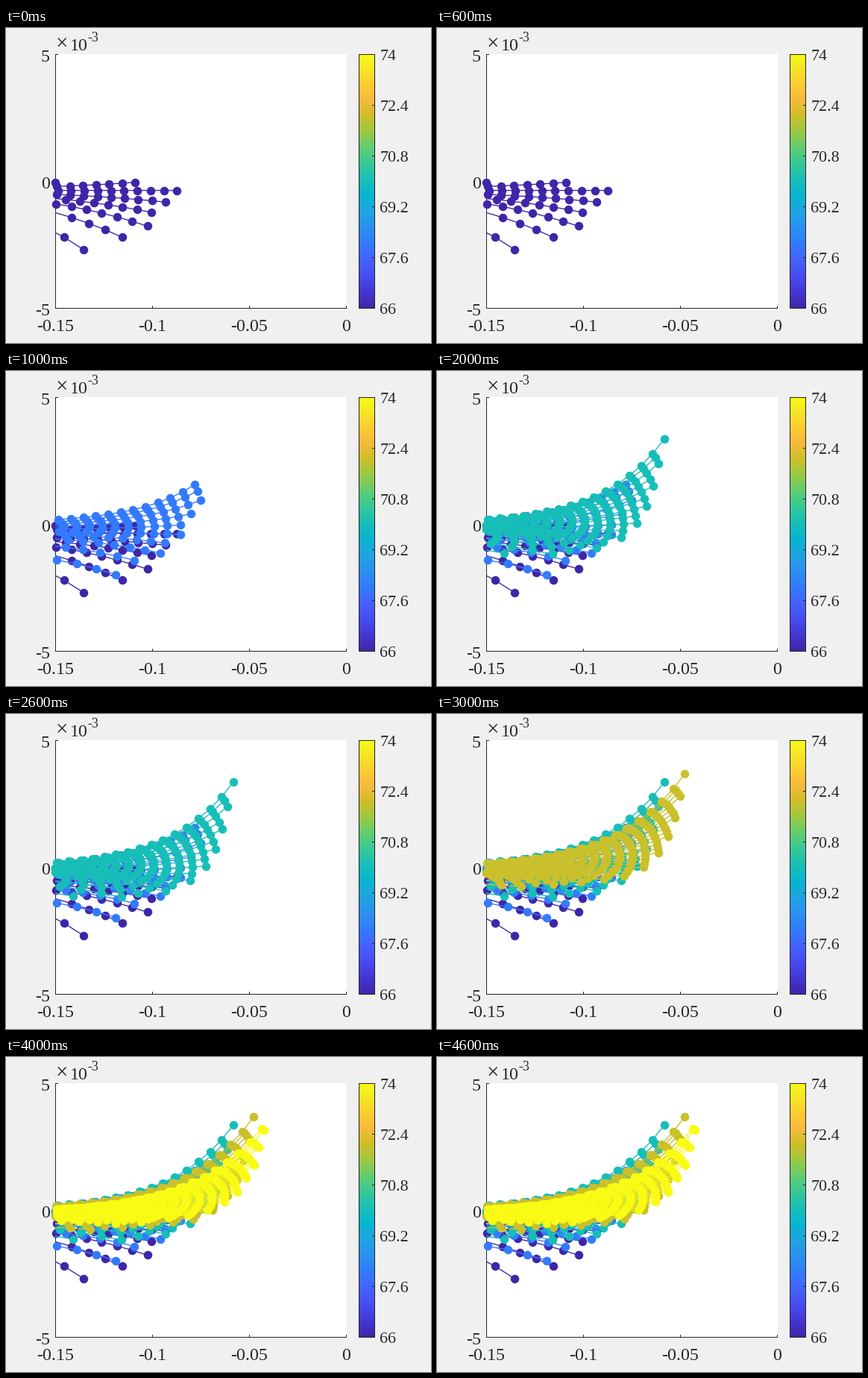
A matplotlib script that plays this animation: 570 by 422 pixels, repeating every 5 s.

```python
import numpy as np
import matplotlib.pyplot as plt
from matplotlib.animation import FuncAnimation
from matplotlib.colors import LinearSegmentedColormap
from matplotlib.patches import Rectangle

W, H, DPI = 570, 422, 100
PX = 72 / DPI
INK = "#262626"
LEFT, RIGHT, TOP, BOTTOM = 66.5, 456.5, 35.5, 375.5

STOPS = ("3E26A8 4537D5 484DF0 4563FD 327CFC 2B91EF 20A5E3 08B5D0 19BFB6 "
         "37C897 64CD6F 9DC943 D1BF27 F8BA3D FCCF30 F5E924 F9FB15").split()
PLACES = [min(4 * i / 63, 1) for i in range(len(STOPS))]
CMAP = LinearSegmentedColormap.from_list(
    "scale", [(p, "#" + s) for p, s in zip(PLACES, STOPS)])

# near, span: columns between x = 0 and the first point, and how many the last curve gains
# squeeze: how far the steps widen; top, lift, swing: heights in pixels
# start, rise, steep: where each curve ends; fold: cuts the uppermost curves short
FANS = [
    dict(near=16.3, span=3.8, squeeze=0.33, top=207, lift=-9, swing=52,
         start=-4.55, rise=4.9, steep=0, fold=6),
    dict(near=12.2, span=4.5, squeeze=0.37, top=199, lift=-47, swing=120,
         start=-1.1, rise=4.9, steep=0, fold=0),
    dict(near=9.6, span=6.2, squeeze=0.51, top=199, lift=-108, swing=230,
         start=-0.3, rise=7.8, steep=0, fold=0),
    dict(near=7.95, span=4.95, squeeze=0.41, top=200, lift=-120, swing=175,
         start=-0.3, rise=7.0, steep=3.2, fold=0),
    dict(near=7.3, span=4.6, squeeze=0.36, top=204, lift=-108, swing=140,
         start=-0.3, rise=7.5, steep=2.6, fold=0),
]

fig = plt.figure(figsize=(W / DPI, H / DPI), dpi=DPI, facecolor="#F0F0F0")
ax = fig.add_axes([0, 0, 1, 1])
ax.axis("off")


def label(x, y, text, size=24, ha="left"):
    ax.text(x, y, text, fontsize=size * PX, family="Liberation Serif",
            color=INK, ha=ha, va="baseline")


def stroke(xs, ys):
    ax.plot(xs, ys, color=INK, lw=PX, zorder=2, snap=False,
            solid_capstyle="projecting", solid_joinstyle="miter")


def draw_axes():
    ax.add_patch(Rectangle((66, 35), 391, 341, fc="white", lw=0, zorder=0))
    stroke([LEFT, LEFT, RIGHT], [TOP, BOTTOM, BOTTOM])
    for text, x in zip(("-0.15", "-0.1", "-0.05", "0"), np.linspace(LEFT, RIGHT, 4)):
        stroke([x, x], [BOTTOM, BOTTOM - 3])
        label(x, 405.5, text, ha="center")
    for text, y in zip(("5", "0", "-5"), np.linspace(TOP, BOTTOM, 3)):
        stroke([LEFT, LEFT + 3], [y, y])
        label(59, y + 9.5, text, ha="right")
    label(67, 30, "×", 29)
    label(86, 29.5, "10")
    label(109.5, 18.5, "-3", 18)


def draw_scale():
    x0, x1 = 473.5, 494.5
    ax.imshow(np.linspace(1, 0, 256)[:, None], cmap=CMAP, aspect="auto",
              extent=(x0, x1, BOTTOM, TOP), interpolation="nearest", zorder=1)
    stroke([x0, x1, x1, x0, x0], [TOP, TOP, BOTTOM, BOTTOM, TOP])
    for text, y in zip(("74", "72.4", "70.8", "69.2", "67.6", "66"),
                       np.linspace(TOP, BOTTOM, 6)):
        stroke([x1 - 3, x1], [y, y])
        label(501.5, y + 7.5, text, 22)


def curve(k, j, u, near, span, squeeze, top, lift, swing, start, rise, steep, fold):
    """Points of curve j in family k; u runs from 0 (top) to 1 (bottom)."""
    step = (15.6 + 1.9 * np.exp(-0.6 * k * k)) / (1 - squeeze * u ** 2.5)
    x0 = RIGHT - step * (near - span * u ** (1.6 * 0.87 ** k))
    first = np.ceil(max(start + rise * u + steep * u ** 8, fold * (1 - j)))
    x = x0 - step * np.arange(first, int((x0 - LEFT) / step) + 2)

    edge = top + (37 - 8 * k) * u + (30 - 5 * k) * u ** 8
    bend = (3 - 2.2 * 0.27 ** k) * (1 - 0.4 * u)
    t = (x - LEFT) / (x0 - LEFT)
    y = edge + (lift + swing * u ** 1.4) * np.expm1(bend * t) / np.expm1(bend)
    return x, y


def draw_fan(k, fan):
    """Draw one family of curves and return its artists."""
    color, z = CMAP(k / 4), 3 + k
    window = Rectangle((66, 35), 391, 341, transform=ax.transData)
    count = max(8, 4 + 6 * k)
    artists, dots = [], []
    for j in range(count):
        x, y = curve(k, j, j / (count - 1), **fan)
        line, = ax.plot(x, y, color=color, lw=1.35 * PX, zorder=z)
        line.set_clip_path(window)
        artists.append(line)
        dots += [p for p in zip(x, y) if p[0] >= 65.5]
    marks, = ax.plot(*zip(*dots), "o", color=color, ms=11.5 * PX, mew=0,
                     zorder=z + 0.5, snap=False)
    return artists + [marks]


draw_axes()
draw_scale()
groups = [draw_fan(k, fan) for k, fan in enumerate(FANS)]
ax.set_xlim(0, W)
ax.set_ylim(H, 0)


def update(i):
    for k, group in enumerate(groups):
        for artist in group:
            artist.set_visible(k <= i)
    return [a for group in groups for a in group]


anim = FuncAnimation(fig, update, frames=len(FANS), interval=1000,
                     repeat=True, repeat_delay=0, blit=False)
plt.show()
```
